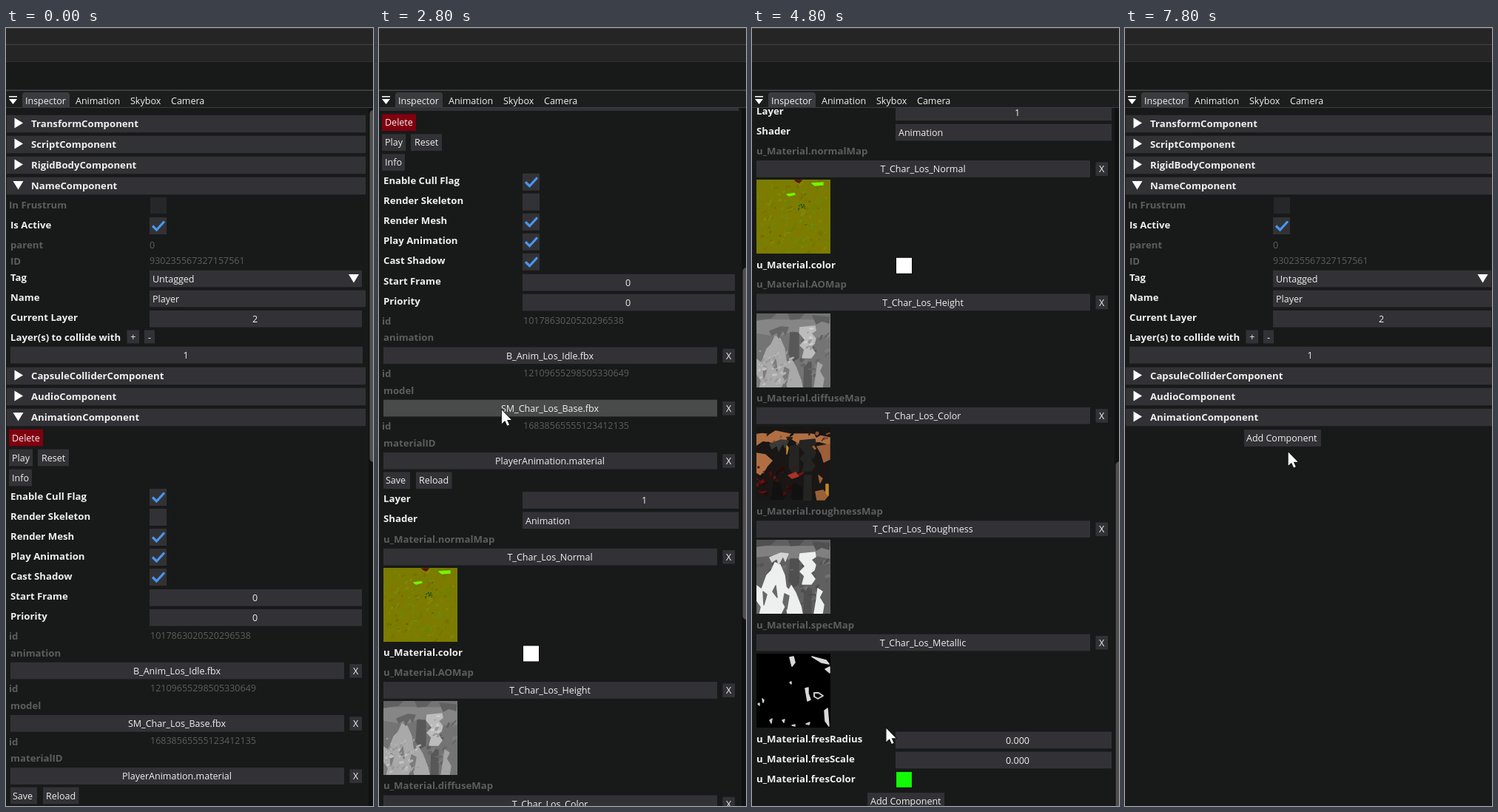
These frames come from a looping animation (496x1052 px, 8 s). An HTML page with a canvas:

```html
<!DOCTYPE html>
<html lang="en">
<head>
<meta charset="utf-8">
<style>
html, body { margin: 0; width: 100%; height: 100%; overflow: hidden; background: #181a19; }
canvas { display: block; }
</style>
</head>
<body>
<canvas id="stage" width="496" height="1052"></canvas>
<script>
const W = 496, H = 1052, LOOP = 8000;
const ctx = document.getElementById('stage').getContext('2d');
const BG = '#181a19', FRAME = '#323236', HOVER = '#484b49', TEXT = '#f0f0f0', DIM = '#5c5e5d', BLUE = '#4a96ee';
const REGULAR = '12.5px "Open Sans", "Noto Sans", sans-serif';
const BOLD = 'bold 13.2px "Open Sans", "Noto Sans", sans-serif';
const FRAME_H = 22.7;

// Wheel notches: time and direction
const NOTCH = 85.25, MAX_SCROLL = 950.9, COLLAPSE = 7500;
const wheel = [
  [1500, 1], [1900, 1], [2200, 1], [2500, 1], [2800, 1], [3100, 1], [3400, 1],
  [3700, 1], [3900, 1], [4100, 1], [4300, 1], [4500, 1],
  [5700, -1], [5800, -1], [6000, -1], [6100, -1], [6200, -1], [6300, -1],
  [6400, -2], [6500, -1], [6600, -1], [6700, -1], [6800, -1]
];
const pointerPath = [
  [100, 230, 1043], [500, 190, 600], [900, 181, 446], [2300, 179.5, 442.5], [2700, 170, 500],
  [3400, 97, 800], [3500, 95, 803.5], [4000, 120, 860], [4700, 181.5, 947], [4900, 181.5, 947],
  [5400, 149, 280], [6000, 148.8, 274.5], [6500, 148.8, 274], [6900, 148.8, 274],
  [7300, 146, 524], [7500, 146, 526], [7700, 218, 572], [7800, 220.7, 573.5]
];

function scrollAt(t) {
  let s = 0;
  for (const [at, dir] of wheel)
    if (t >= at) s = Math.max(0, Math.min(MAX_SCROLL, s + dir * NOTCH));
  return s;
}

function pointerAt(t) {
  if (t < pointerPath[0][0]) return { x: -99, y: -99 };
  const i = pointerPath.findIndex(k => k[0] >= t);
  if (i < 1) {
    const k = pointerPath[i < 0 ? pointerPath.length - 1 : 0];
    return { x: k[1], y: k[2] };
  }
  const a = pointerPath[i - 1], b = pointerPath[i];
  let p = (t - a[0]) / (b[0] - a[0]);
  p = p * p * (3 - 2 * p);
  return { x: a[1] + (b[1] - a[1]) * p, y: a[2] + (b[2] - a[2]) * p };
}

// Texture thumbnails
function texture(base, paint) {
  const c = document.createElement('canvas');
  c.width = c.height = 100;
  const g = c.getContext('2d');
  let seed = 7001;
  const rnd = (lo, hi) => {
    seed = (seed * 16807) % 2147483647;
    return lo + (hi - lo) * seed / 2147483647;
  };
  const fill = (color, d) => {
    const shape = new Path2D(d);
    g.fillStyle = g.strokeStyle = color;
    g.lineWidth = 1.5;
    g.lineJoin = 'round';
    g.fill(shape);
    g.stroke(shape);
  };
  const specks = (n, colors, x, y, w, h, size) => {
    for (let i = 0; i < n; i++) {
      g.fillStyle = colors[i % colors.length];
      g.beginPath();
      g.ellipse(rnd(x, x + w), rnd(y, y + h), rnd(1, size), rnd(.5, size / 2), rnd(-1.2, 0), 0, 7);
      g.fill();
    }
  };
  g.fillStyle = base;
  g.fillRect(0, 0, 100, 100);
  paint(fill, specks, g);
  return c;
}

const PEAKS = 'M0 100V62L7 67L14 48L20 42L25 31L32 34L38 48L40 64L44 68L47 62L53 72L60 90L62 100H42L40 86L33 100Z';
const STACK = 'M59 19L79 17L80 23L74 27L80 34L78 41L73 45L79 53L74 60H62L65 49L59 43L66 36L58 26Z';
const CHIPS = 'M0 0H26L20 6L0 9ZM43 0H64L58 7L46 8ZM76 3L98 5V13L88 10L81 14Z';
const STREAKS = 'M18 24L33 18L43 19L39 29L36 22L30 33L28 25L21 30Z';
const COLUMNS = 'M46 26H57V60L50 64L44 55ZM65 66H74V100H64Z';
const SIDE = 'M83 66L89 70L85 78L91 88L89 100H78L81 82Z';
const GAPS = 'M9 70L14 74L10 88ZM22 70L26 62L28 78ZM38 73L44 76L41 94L36 85ZM0 84L5 91L3 100H0Z';

const maps = {
  normal: texture('#7b7c00', (fill, specks) => {
    specks(160, ['#73830a', '#857600', '#6f8000', '#80870a', '#777200'], 0, 0, 100, 100, 5);
    specks(16, ['#7d5205', '#60980f'], 5, 18, 90, 70, 2.5);
    fill('#5c1206', 'M52 1H61L58 4L55 3Z');
    fill('#74f500', 'M75 5L90 4V7L79 8ZM41 20L51 18.5L52 20L44 22Z');
    specks(9, ['#204000', '#00602a'], 56, 33, 10, 8, 1.8);
  }),
  height: texture('#747474', (fill, specks) => {
    fill('#868686', 'M0 9H99V32H68L49 23L30 31L0 26Z');
    fill('#606060', CHIPS);
    fill('#585858', COLUMNS);
    specks(24, ['#676767', '#7d7d7d', '#5f5f5f'], 56, 25, 44, 70, 7);
    fill('#a9a9a9', PEAKS);
    fill('#bcbcbc', STACK);
    fill('#a4a4a4', SIDE);
    fill('#666', STREAKS);
    fill('#7c7c7c', GAPS);
    specks(45, ['#c0c0c0', '#989898', '#b2b2b2'], 3, 50, 46, 48, 4);
    specks(12, ['#d2d2d2', '#9a9a9a'], 62, 20, 14, 38, 4);
  }),
  diffuse: texture('#191615', (fill, specks) => {
    fill('#b06f43', 'M0 8L18 11L26 6L45 10H74L99 15V24L84 20L60 24L47 16L25 22L9 19L0 25ZM0 36L12 38L21 46L14 54L7 66L0 62Z');
    fill('#9c5f39', 'M62 25L75 22L80 30L73 34L66 31ZM82 27L99 24V44L91 48L88 37Z');
    fill('#171615', CHIPS);
    specks(22, ['#171310', '#8b4f30', '#2a1c16'], 0, 7, 100, 24, 5);
    fill('#3a3a38', STREAKS);
    fill('#242423', COLUMNS + STACK);
    specks(40, ['#4d0c07', '#2c0907', '#6d130d', '#111'], 0, 54, 62, 44, 5);
    fill('#a8332a', 'M43 66L53 62L57 67L48 70Z');
    fill('#9a6038', 'M84 66L89 70L86 76ZM80 88L90 86L97 93L92 99H82Z');
    fill('#c28a25', 'M41 26L43 29L41 37ZM94 78H97V93L94 90Z');
    fill('#111', 'M20 98L24 74L33 80L36 98ZM49 98L50 77L61 81V98Z');
  }),
  roughness: texture('#606060', (fill, specks) => {
    fill('#808080', 'M0 9H99V25L74 20L47 27L28 20L0 23Z');
    fill('#505050', CHIPS + COLUMNS);
    specks(26, ['#4d4d4d', '#717171', '#575757'], 56, 24, 44, 70, 6);
    specks(12, ['#555', '#6d6d6d'], 0, 24, 50, 20, 5);
    fill('#eef0ef', PEAKS + STACK + SIDE);
    fill('#d4d4d4', STREAKS);
    fill('#686868', GAPS);
  }),
  spec: texture('#000', (fill, specks, g) => {
    fill('#d8d8d8', 'M45 5L50 4L52 12L48 17ZM75 4L94 9L98 14L88 12ZM93 21L99 18V26ZM66 47L70 46V54L73 62L69 64ZM8 61L10 63L9 66ZM92 77L96 74L98 98L93 91Z');
    fill('#ccc', 'M2 68L4 67V70ZM45 39L47 38V41ZM18 90L21 88L20 94ZM35 90L38 89L37 93ZM48 97L52 96V98ZM67 95L72 93L71 96Z');
    g.lineWidth = 2;
    g.stroke(new Path2D('M78 53H84L90 57L83 61L78 58Z'));
  })
};

let pointer, offset;

function text(str, x, y, { font = REGULAR, color = TEXT, align = 'left' } = {}) {
  ctx.font = font;
  ctx.fillStyle = color;
  ctx.textAlign = align;
  ctx.fillText(str, x, y + (font === BOLD ? 4.7 : 4.5));
}

function rect(color, x, y, w, h) {
  ctx.fillStyle = color;
  ctx.fillRect(x, y, w, h);
}

function box(x, right, cy, height = FRAME_H, color = FRAME) {
  const py = pointer.y + offset;
  const hot = pointer.y > 108 && pointer.x >= x && pointer.x < right && Math.abs(py - cy) < height / 2;
  rect(hot && color === FRAME ? HOVER : color, x, cy - height / 2, right - x, height);
}

function triangle(x, y, down) {
  ctx.fillStyle = '#fff';
  ctx.fill(new Path2D(down
    ? `M${x - 7} ${y - 5.5}H${x + 7}L${x} ${y + 6}Z`
    : `M${x - 5} ${y - 7}V${y + 7}L${x + 6.5} ${y}Z`));
}

function header(name, y, open, right) {
  box(1, right, y + .5, 23.5);
  triangle(16.5, y - .5, open);
  text(name, 34, y + .7, { font: BOLD });
}

const label = (str, y, x = 6) => text(str, x, y, { font: BOLD });
const faded = (str, y, x = 6) => text(str, x, y, { font: BOLD, color: DIM });

function button(str, x, right, y, textX, color) {
  box(x, right, y, FRAME_H, color);
  text(str, textX, y);
}

function field(str, x, right, y, center = (x + right) / 2) {
  box(x, right, y + .3);
  text(str, center, y + .5, { align: 'center' });
}

function swatch(color, y) {
  rect('#0c0d0c', 194, y, 23, 23);
  rect(color, 195, y + 1, 21, 21);
}

function check(name, y, col, on) {
  label(name, y);
  box(col, col + 23, y + 1.5, 23);
  if (!on) return;
  ctx.strokeStyle = BLUE;
  ctx.lineWidth = 3.2;
  ctx.stroke(new Path2D(`M${col + 4} ${y + 1.5}L${col + 9.5} ${y + 7}L${col + 20} ${y - 4.5}`));
}

function asset(file, y) {
  field(file, 6, 457, y - .2, 231);
  box(464.5, 481, y + .3, 18.5);
  text('X', 472.7, y + .4, { align: 'center' });
}

function nameSection(open) {
  const col = open ? 194 : 200, edge = open ? 481 : 495, right = open ? 486 : 496;
  ['Transform', 'Script', 'RigidBody'].forEach((n, i) => header(n + 'Component', 129 + 28 * i, false, right));
  header('NameComponent', 213, true, right);
  faded('In Frustrum', 239, 4);
  rect('#262729', col + 1, 229, 22, 22);
  check('Is Active', 266, col, true);
  faded('parent', 293);
  text('0', col, 293, { color: DIM });
  faded('ID', 315);
  text('930235567327157561', col, 314.5, { color: DIM });
  label('Tag', 337.5);
  box(col, edge, 339);
  text('Untagged', col + 4, 339.5);
  triangle(open ? 470 : 483.5, 338.5, true);
  label('Name', 364.5);
  box(col, right, 366);
  text('Player', col + 4, 366.7);
  label('Current Layer', 391.5);
  field('2', col, edge, 393, open ? 336.5 : 346.5);
  label('Layer(s) to collide with', 418.5);
  box(163.5, 180, 417.5, 18);
  text('+', 171.7, 417.5, { align: 'center' });
  box(187, 201, 417.5, 18);
  text('-', 194, 418, { align: 'center' });
  field('1', 6, open ? 482 : 495, 442, open ? 243 : 250);
  header('CapsuleColliderComponent', 470, false, right);
  header('AudioComponent', 498, false, right);
  header('AnimationComponent', 526, open, right);
}

function animationSection() {
  button('Delete', 4, 50, 554, 8, '#80000f');
  button('Play', 4, 36, 581, 8);
  button('Reset', 43, 85, 581, 48);
  button('Info', 4, 35, 608, 8);
  ['Enable Cull Flag', 'Render Skeleton', 'Render Mesh', 'Play Animation', 'Cast Shadow']
    .forEach((n, i) => check(n, 633 + 27 * i, 194, i !== 1));
  label('Start Frame', 768.5);
  field('0', 194, 481, 770, 336.5);
  label('Priority', 795.5);
  field('0', 194, 481, 797, 336.5);
  [['1017863020520296538', 'animation', 'B_Anim_Los_Idle.fbx'],
   ['12109655298505330649', 'model', 'SM_Char_Los_Base.fbx'],
   ['16838565555123412135', 'materialID', 'PlayerAnimation.material']
  ].forEach(([id, kind, file], i) => {
    const y = 822 + 71.2 * i;
    faded('id', y + .5, 4);
    text(id, 195, y - .5, { color: DIM });
    faded(kind, y + 23);
    asset(file, y + 47);
  });
  button('Save', 6, 42, 1038, 9);
  button('Reload', 50, 98.5, 1038, 54);
}

function mapRow(name, file, image, y) {
  faded('u_Material.' + name, y);
  asset(file, y + 24);
  ctx.drawImage(image, 6, Math.round(y + 39 - offset) + offset);
}

function materialSection() {
  label('Layer', 1063);
  field('1', 194, 486, 1064.5, 358.5);
  label('Shader', 1090);
  box(194, 486, 1092);
  text('Animation', 198, 1092.6);
  mapRow('normalMap', 'T_Char_Los_Normal', maps.normal, 1117.3);
  label('u_Material.color', 1270.7);
  swatch('#fff', 1260.7);
  [['AOMap', 'Height', maps.height], ['diffuseMap', 'Color', maps.diffuse],
   ['roughnessMap', 'Roughness', maps.roughness], ['specMap', 'Metallic', maps.spec]
  ].forEach(([name, file, image], i) => mapRow(name, 'T_Char_Los_' + file, image, 1297.6 + 153.4 * i));
  label('u_Material.fresRadius', 1911.7);
  field('0.000', 194, 486, 1913.5, 359);
  label('u_Material.fresScale', 1938.7);
  field('0.000', 194, 486, 1940.5, 359);
  label('u_Material.fresColor', 1965.7);
  swatch('#12fa06', 1955.8);
  button('Add Component', 156, 260, 1996.3, 160);
}

function chrome() {
  rect('#242524', 0, 0, W, 46);
  rect('#3c3d3c', 0, 0, W, 1);
  rect('#434443', 0, 22, W, 1);
  rect('#303130', 0, 45, W, 1);
  rect(BG, 0, 46, W, 38);
  rect('#464746', 0, 83.5, W, 1.5);
  rect('#1c1e1d', 0, 85, W, 23);
  rect('#3c3d3f', 0, 107, W, 1);
  ctx.fillStyle = '#3a3b3e';
  ctx.beginPath();
  ctx.roundRect(22, 87, 64, 21, [4, 4, 0, 0]);
  ctx.fill();
  rect('#fff', 4, 92, 11, 1.5);
  ctx.fill(new Path2D('M4 96H15L9.5 103Z'));
  text('Inspector', 26, 98);
  text('Animation', 94, 98);
  text('Skybox', 168, 98);
  text('Camera', 223, 98);
}

function scrollbar() {
  rect('#101211', 490, 108, 6, H - 108);
  ctx.fillStyle = '#4f504f';
  ctx.beginPath();
  ctx.roundRect(491.5, 111 + offset * .4997, 12, 476, 5);
  ctx.fill();
}

function drawPointer() {
  ctx.save();
  ctx.translate(pointer.x, pointer.y);
  ctx.scale(1.08, 1.08);
  const arrow = new Path2D('M0 0V17L4 13.3L6.8 19.5L9.3 18.4L6.6 12.3H12Z');
  ctx.strokeStyle = '#111';
  ctx.lineWidth = 1.5;
  ctx.stroke(arrow);
  ctx.fillStyle = '#fff';
  ctx.fill(arrow);
  ctx.restore();
}

function draw(t) {
  const open = t < COLLAPSE;
  pointer = pointerAt(t);
  offset = scrollAt(t);
  rect(BG, 0, 0, W, H);
  ctx.save();
  ctx.beginPath();
  ctx.rect(0, 108, W, H - 108);
  ctx.clip();
  ctx.translate(0, -offset);
  nameSection(open);
  if (open) {
    animationSection();
    materialSection();
  } else {
    button('Add Component', 161, 265, 554.5, 164);
  }
  ctx.restore();
  if (open) scrollbar();
  chrome();
  drawPointer();
}

const start = performance.now();
function animate() {
  const t = (performance.now() - start) % LOOP;
  draw(Math.min(7800, Math.floor(t / 100) * 100));
  requestAnimationFrame(animate);
}
animate();
</script>
</body>
</html>
```
